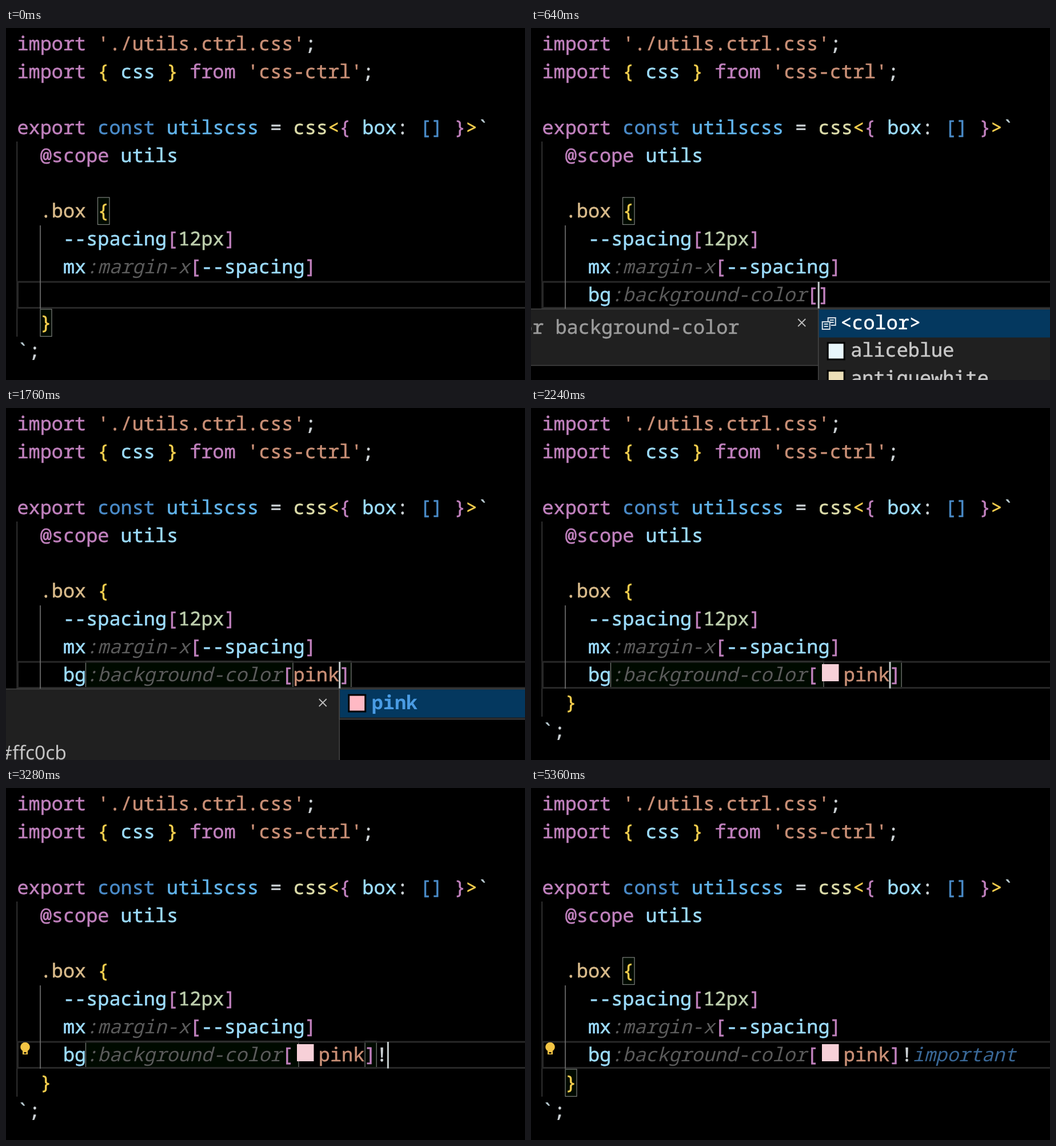
Recreate the animation shown at these times as an HTML page. Size 908x617 px, loop 5.44 s.

```html
<!DOCTYPE html>
<html lang="en">
<head>
<meta charset="utf-8">
<title>Editor typing</title>
<style>
  html, body { margin: 0; width: 100%; height: 100%; overflow: hidden; background: #000; }
  svg { display: block; width: 100vw; height: 100vh; }
  text { font: 33.55px "Noto Sans Mono", monospace; white-space: pre; text-rendering: geometricPrecision; }
  text, tspan { fill: currentColor; stroke: currentColor; stroke-width: .55px; }
  .doc { font-family: "Noto Sans", sans-serif; color: #c4c4c4; stroke: none; }
  .bold { font-weight: 700; }
  .end { text-anchor: end; }
  .key { color: #c080bd; }
  .str { color: #c98f76; }
  .plain { color: #cdd3d6; }
  .gold { color: #f6cf4e; }
  .var { color: #9cdcfe; }
  .const { color: #4a8bc8; }
  .name { color: #62b5ec; }
  .fn { color: #dcdcaa; }
  .sel { color: #d8ba8a; }
  .num { color: #bccdac; }
  .ghost { color: #5b5b5b; font-style: italic; stroke: none; }
  .hint { color: #396796; font-style: italic; stroke: none; }
  .tick { color: #b7c9cf; }
  .match { color: #4a9ce4; font-weight: 700; stroke: none; }
  .item { color: #c8c8c8; }
  .picked { color: #fff; }
  .note { color: #9b9b9b; }
  .pair { fill: rgba(0, 100, 0, .1); stroke: #7d807d; stroke-width: 1.2; }
  .panel { fill: #202020; stroke: #454545; stroke-width: 1.5; }
  .icon { fill: none; stroke: #d8dfe6; stroke-width: 2; }
</style>
</head>
<body>
<svg viewBox="0 0 908 617" preserveAspectRatio="none">
  <g id="pairs"></g>
  <g id="base"></g>
  <g id="live"></g>
</svg>
<script>
const LOOP = 5440, CHAR = 20.13, ROW = 48.9;
const layer = id => document.getElementById(id);
const colX = col => 19.4 + CHAR * col;
const rowY = row => 39 + ROW * row;
const esc = s => s.replace(/&/g, '&amp;').replace(/</g, '&lt;');

// parts alternate: class, text, class, text, ...
function text(x, y, ...parts) {
  let spans = '';
  for (let i = 0; i < parts.length; i += 2) {
    spans += `<tspan class="${parts[i]}">${esc(parts[i + 1])}</tspan>`;
  }
  return `<text x="${x}" y="${y}">${spans}</text>`;
}
const line = (col, row, ...parts) => text(colX(col), rowY(row), ...parts);
const rect = (x, y, w, h, attrs) => `<rect x="${x}" y="${y}" width="${w}" height="${h}" ${attrs}/>`;
const pairBox = (x1, x2, y) => rect(x1, y, x2 - x1, 47.5, 'class="pair"');

layer('base').innerHTML =
  rect(18.5, 199, 1.5, 342, 'fill="#3e3e3e"') +
  rect(20.5, 445, 900, 45.5, 'fill="none" stroke="#282828" stroke-width="3"') +
  rect(59.2, 346, 1.6, 146, 'fill="#737373"') +
  line(0, 0, 'key', 'import ', 'str', "'./utils.ctrl.css'", 'plain', ';') +
  line(0, 1, 'key', 'import ', 'gold', '{ ', 'var', 'css', 'gold', ' } ', 'key', 'from ',
    'str', "'css-ctrl'", 'plain', ';') +
  line(0, 3, 'key', 'export ', 'const', 'const ', 'name', 'utilscss', 'plain', ' = ', 'fn', 'css',
    'gold', '<', 'key', '{ ', 'var', 'box', 'plain', ': ', 'const', '[]', 'key', ' }', 'gold', '>', 'tick', '`') +
  line(2, 4, 'key', '@scope', 'var', ' utils') +
  line(2, 6, 'sel', '.box ', 'gold', '{') +
  line(4, 7, 'var', '--spacing', 'key', '[', 'num', '12px', 'key', ']') +
  line(4, 8, 'var', 'mx', 'ghost', ':margin-x', 'key', '[', 'var', '--spacing', 'key', ']') +
  line(2, 10, 'gold', '}') +
  line(0, 11, 'tick', '`', 'plain', ';');

const shortcuts = [['bg'], ['bga'], ['bgbm']];
const allColors = [['<color>'], ['aliceblue', '#e8f6fb'], ['antiquewhite', '#ecdfb8']];
const pColors = [['palegoldenrod', '#e2d88e'], ['palegreen', '#98f08c'], ['paleturquoise', '#a8daee']];
const pink = [['pink', '#ffb9c4']];
const piColors = [...pink, ['papayawhip', '#ffefd5'], ['paleturquoise', '#a8daee']];
const goldenDoc = ['palegoldenrod', '#eee8aa', 240];
const pinkDoc = end => ['pink', '#ffc0cb', end];

// word: shorthand typed; value: text in brackets; cursor: opacity; outer/inner: bracket pair shown
const steps = [
  [0, { outer: 1 }],
  [160, { outer: 1, word: 'b', cursor: 1, list: shortcuts, typed: 1 }],
  [240, { outer: 1, word: 'bg', cursor: 1, list: shortcuts, typed: 2 }],
  [640, { outer: 1, value: '', cursor: 1, list: allColors, note: 1 }],
  [720, { inner: 1, value: '', cursor: 1, list: allColors, note: 1 }],
  [1040, { inner: 1, value: '', list: allColors, note: 1, bulb: 1 }],
  [1280, { inner: 1, value: 'p', cursor: 1, list: pColors, typed: 1, doc: [], bulb: 1 }],
  [1360, { inner: 1, value: 'p', cursor: 1, list: pColors, typed: 1, doc: goldenDoc, bulb: 1 }],
  [1600, { inner: 1, value: 'pi', cursor: 1, list: piColors, typed: 2, doc: pinkDoc(66) }],
  [1680, { inner: 1, value: 'pin', cursor: 1, list: pink, typed: 3, doc: pinkDoc(86) }],
  [1760, { inner: 1, value: 'pink', cursor: 1, list: pink, typed: 4, doc: pinkDoc(106) }],
  [2160, { inner: 1, value: 'pink', cursor: 1 }],
  [2240, { inner: 1, value: 'pink', cursor: 1, swatch: 1 }],
  [2400, { inner: 1, value: 'pink', cursor: .65, swatch: 1, bulb: 1 }],
  [2640, { inner: 1, value: 'pink', cursor: 1, swatch: 1, after: 1 }],
  [2720, { inner: 1, value: 'pink', cursor: 1, swatch: 1, after: 1, bulb: 1 }],
  [3120, { inner: 1, value: 'pink', swatch: 1, after: 1, bulb: 1 }],
  [3280, { inner: 1, value: 'pink', cursor: 1, swatch: 1, after: 2, bang: 1, bulb: 1 }],
  ...[3360, 3680, 4160, 4560, 4960, 5360].map((time, i) =>
    [time, { outer: 1, value: 'pink', cursor: 1 - i % 2, swatch: 1, after: 2, bang: 1, hint: 1, bulb: 1 }])
];

function popup(s, left) {
  const height = s.list.length === 1 ? 53 : 140;
  let out = rect(left, 492.5, 787, height, 'class="panel"') +
    rect(left + 1, 493.5, 786, 49, 'fill="#04385f"');
  s.list.forEach(([label, color], i) => {
    const y = 527.5 + ROW * i, typed = s.typed || 0;
    if (color) out += rect(left + 16.5, 503 + ROW * i, 29, 29, `fill="${color}" stroke="#000" stroke-width="3"`);
    else out += `<path class="icon" transform="translate(${left + 6} ${507 + ROW * i})"
      d="M11 7V1H24V14H16M14 5H21M14 9H21M1 8H14V21H1ZM4 12H11M4 16H11"/>`;
    out += text(left + (color ? 56.5 : 38.5), y, 'match', label.slice(0, typed),
      i ? 'item' : 'picked', label.slice(typed));
  });
  return out;
}

function details(s, left) {
  const x = left - 29, height = s.note ? 99 : 140;
  let out = rect(-5, 492.5, left + 5, height, 'class="panel"') +
    `<path d="M${x - 6.5} 510l13 13m0 -13l-13 13" stroke="#bdbdbd" stroke-width="1.8"/>`;
  if (s.note) return out + text(-18, 535.5, 'note', 'or background-color');
  const [name, hex, end] = s.doc;
  if (!name) return out;
  const piece = (x, cls, str) => `<text class="doc ${cls}" x="${x}" y="616">${str}</text>`;
  return out + piece(end - 207, 'bold end', name) + piece(end - 194, '', '=&gt;') + piece(end, 'end', hex);
}

// Geometry of the edited line
function measure(s) {
  const valueX = colX(24) + (s.swatch ? 44.3 : 0);
  const closeX = valueX + CHAR * (s.value || '').length;
  const caret = s.value === undefined
    ? colX(4 + (s.word || '').length)
    : closeX + CHAR * (s.after || 0);
  return { valueX, closeX, caret: caret + .7 };
}

function drawPairs(s) {
  const { closeX } = measure(s);
  if (s.outer) return pairBox(160.5, 181, 297) + pairBox(60, 80, 493);
  return pairBox(139.5, s.swatch ? 512 : 502, 444) + pairBox(closeX + .7, closeX + .7 + CHAR, 444);
}

function drawLive(s) {
  const { valueX, caret } = measure(s);
  let out = '';
  if (s.bulb) {
    out += '<circle cx="33.5" cy="454" r="8.3" fill="#f3c444"/>' +
      '<path d="M29 458h9v9h-9z" fill="#f3c444"/><path d="M31.5 463h4v2.5h-4z" fill="#000"/>';
  }
  if (s.word) out += line(4, 9, 'var', s.word);
  if (s.value !== undefined) {
    out += line(4, 9, 'var', 'bg', 'ghost', ':background-color', 'key', '[') +
      text(valueX, rowY(9), 'str', s.value, 'key', ']', 'plain', s.bang ? '!' : '', 'hint', s.hint ? 'important' : '');
  }
  if (s.swatch) out += rect(509, 449, 29.5, 30, 'fill="#f7d0d8"');
  if (s.note || s.doc) out += details(s, caret - .5);
  if (s.list) out += popup(s, caret - .5);
  if (s.cursor) out += rect(caret - 1.5, 445, 3, 46.5, `fill="#c4cccc" opacity="${s.cursor}"`);
  return out;
}

const pairs = layer('pairs'), live = layer('live');
let shown = null;
function tick() {
  const time = performance.now() % LOOP;
  const state = steps.findLast(([start]) => start <= time)[1];
  if (state !== shown) {
    shown = state;
    pairs.innerHTML = drawPairs(state);
    live.innerHTML = drawLive(state);
  }
  requestAnimationFrame(tick);
}
tick();
</script>
</body>
</html>
```
